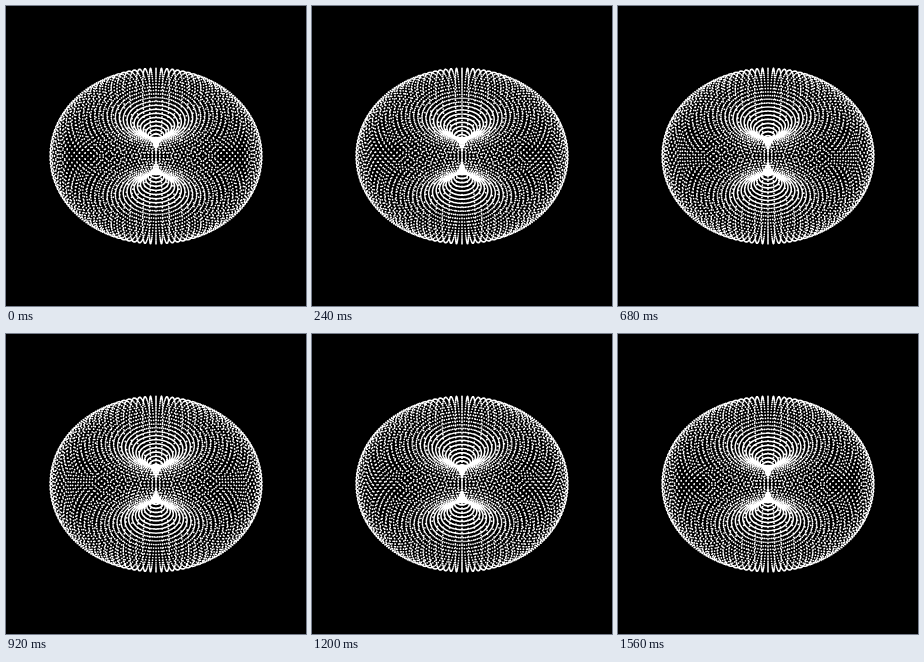
Recreate the animation shown at these times as an HTML page with a canvas. Size 300 px wide and 300 px high, loop 1600 ms.

```html
<!DOCTYPE html>
<html lang="en">
<head>
<meta charset="utf-8">
<title>Dotted horn torus</title>
<style>
html, body { margin: 0; width: 100%; height: 100%; overflow: hidden; background: #000; }
canvas { display: block; }
</style>
</head>
<body>
<canvas id="stage" width="300" height="300"></canvas>
<script>
const ctx = document.getElementById('stage').getContext('2d');
const LOOP = 1600, STEP = 40;
const CENTER = 150, RADIUS = 53, DOT = 0.85;
const MERIDIANS = 100, RINGS = 80;
const TILT = Math.asin(0.655);
const TAU = Math.PI * 2;

// Each ring slides by one spacing around the tube per loop.
function draw(phase) {
  ctx.fillStyle = '#000';
  ctx.fillRect(0, 0, 300, 300);
  ctx.fillStyle = '#fff';
  ctx.beginPath();
  for (let i = 0; i < RINGS; i++) {
    const v = (i + phase) / RINGS * TAU;
    const ring = RADIUS * (1 + Math.cos(v));
    const lift = RADIUS * Math.sin(v) * Math.cos(TILT);
    for (let j = 0; j < MERIDIANS; j++) {
      const u = j / MERIDIANS * TAU;
      const x = CENTER + ring * Math.sin(u);
      const y = CENTER - lift + ring * Math.cos(u) * Math.sin(TILT);
      ctx.moveTo(x + DOT, y);
      ctx.arc(x, y, DOT, 0, TAU);
    }
  }
  ctx.fill();
}

function tick() {
  const time = performance.now() % LOOP;
  draw(Math.floor(time / STEP) * STEP / LOOP);
  requestAnimationFrame(tick);
}
tick();
</script>
</body>
</html>
```
